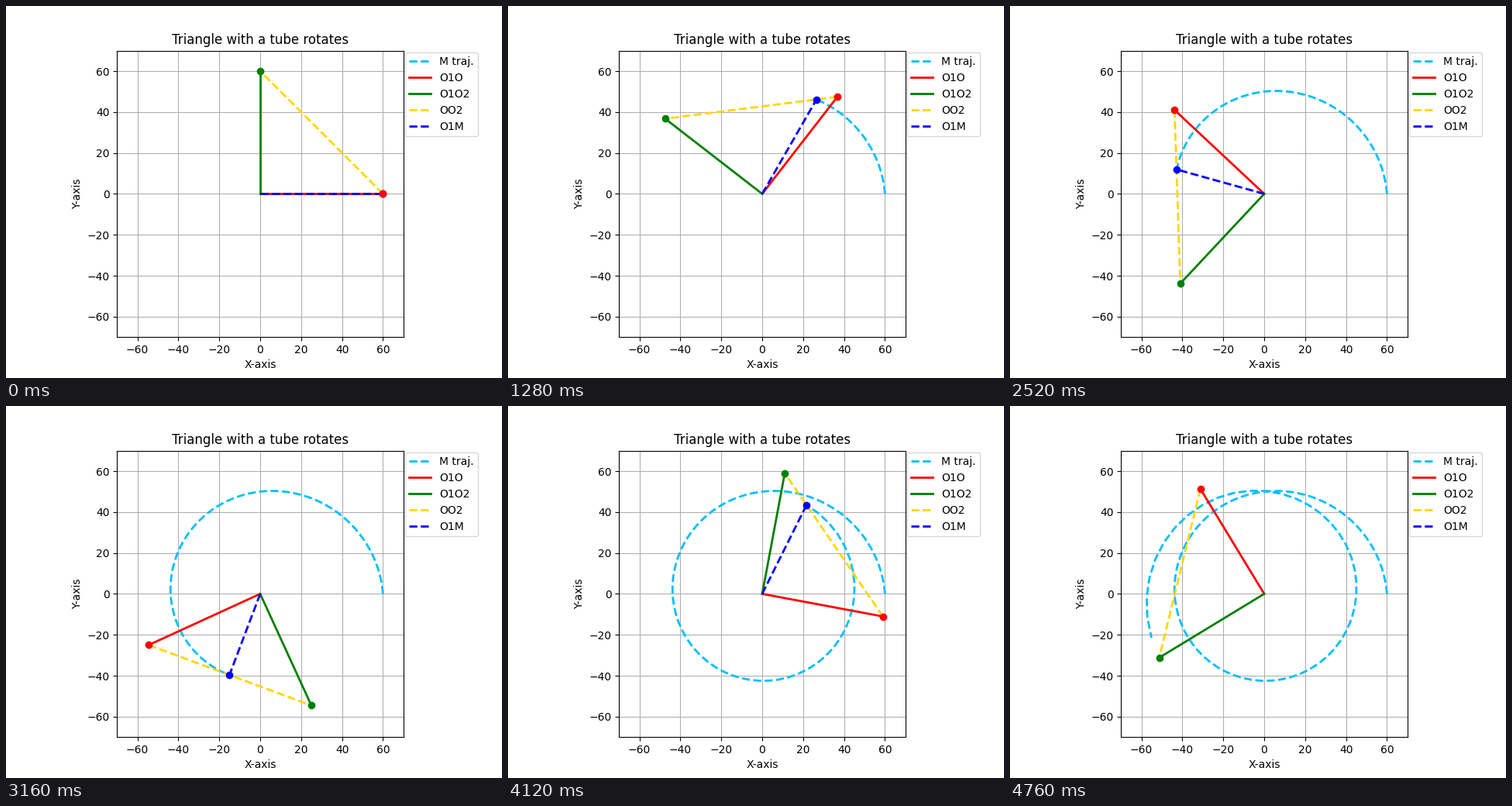
Write a matplotlib script that moves like this. It is 640 px wide and 480 px high and loops after 4800 ms.

```python
import numpy as np
import matplotlib.pyplot as plt
from matplotlib.animation import FuncAnimation

FRAMES = 120
SIDE = 60
LIMIT = 70

# Leg angle and the distance of M from O along the hypotenuse
t = np.linspace(0, 3, FRAMES)
phi = t + 0.2 * t**3
share = 5 * (t + t**2) / SIDE

o = SIDE * np.column_stack([np.cos(phi), np.sin(phi)])
o2 = SIDE * np.column_stack([-np.sin(phi), np.cos(phi)])
m = o + share[:, None] * (o2 - o)
m[-1] = np.nan  # M has left the tube

fig, ax = plt.subplots(figsize=(6.4, 4.8), dpi=100)
ax.set_aspect("equal")
ax.set_xlim(-LIMIT, LIMIT)
ax.set_ylim(-LIMIT, LIMIT)
ax.set_title("Triangle with a tube rotates")
ax.set_xlabel("X-axis")
ax.set_ylabel("Y-axis")
ax.grid(True)


def add_line(color, style, label):
    return ax.plot([], [], style, color=color, lw=2, label=label)[0]


def add_dot(color):
    return ax.plot([], [], "o", color=color)[0]


def join(line, start, end):
    line.set_data(*zip(start, end))


path = add_line("deepskyblue", "--", "M traj.")
leg_o = add_line("red", "-", "O1O")
leg_o2 = add_line("green", "-", "O1O2")
tube = add_line("gold", "--", "OO2")
arm = add_line("blue", "--", "O1M")
dots = [(add_dot("blue"), m), (add_dot("red"), o), (add_dot("green"), o2)]
ax.legend(loc=(1.005, 0.7))


def update(i):
    origin = (0, 0)
    path.set_data(*m[:i + 1].T)
    join(leg_o, origin, o[i])
    join(leg_o2, origin, o2[i])
    join(tube, o[i], o2[i])
    join(arm, origin, m[i])
    for dot, places in dots:
        dot.set_data(*places[i:i + 1].T)
    return [path, leg_o, leg_o2, tube, arm] + [dot for dot, _ in dots]


anim = FuncAnimation(fig, update, frames=FRAMES, interval=40, repeat=True)
plt.show()
```
